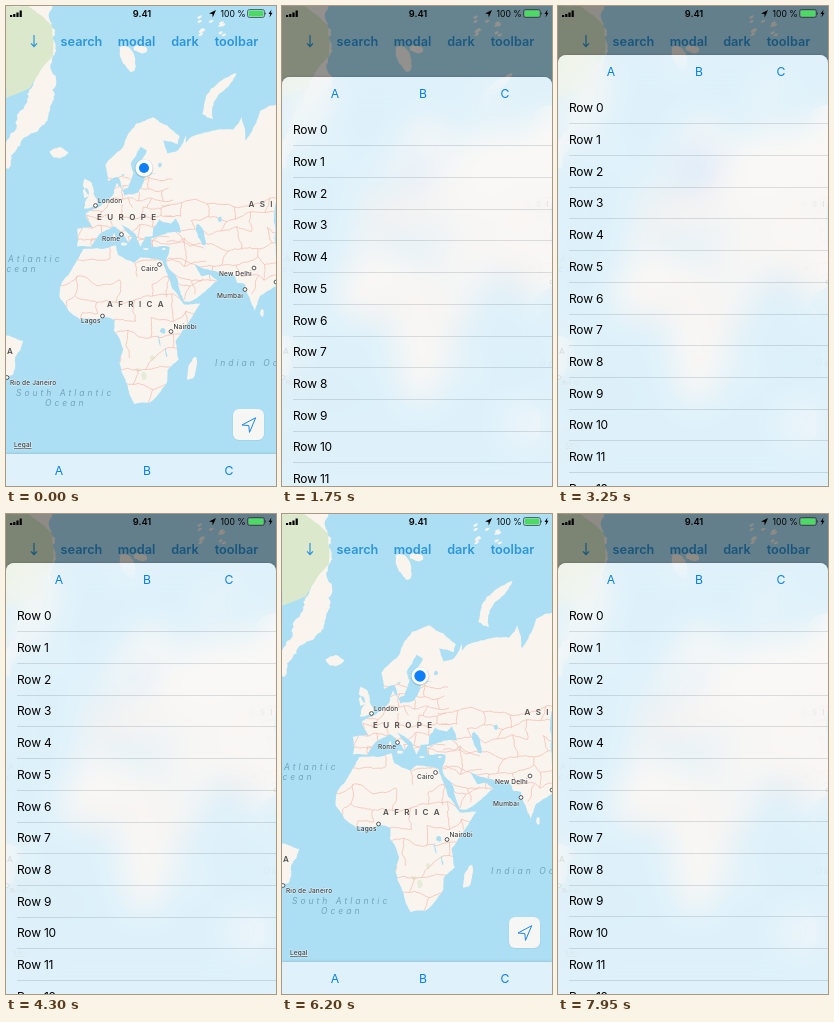
Animation of 270x480 px, one loop 8 s. Source, as an HTML page:

```html
<!DOCTYPE html>
<html lang="en">
<head>
<meta charset="utf-8">
<title>Map with sheet</title>
<style>
  html, body { margin: 0; width: 100%; height: 100%; overflow: hidden; }
  body { position: relative; background: #addff4; font-family: Inter, "Liberation Sans", sans-serif; }
  svg { position: absolute; left: 0; top: 0; width: 270px; height: 480px; }
  #sheet {
    position: absolute; left: 0; top: 0; width: 270px; height: 500px;
    background: rgba(250, 249, 251, .68);
    backdrop-filter: blur(15px) saturate(1.2);
  }
  #sheet b {
    position: absolute; top: 6.7px; width: 40px; margin-left: -20px;
    font: 400 12.2px/20px Inter, "Liberation Sans", sans-serif;
    text-align: center; color: #0a80e6;
  }
  #sheet p {
    position: absolute; left: 11px; right: 0; height: 31px; margin: 0;
    font-size: 12px; line-height: 31px; letter-spacing: -.2px; color: #000;
    border-bottom: .7px solid rgba(60, 70, 80, .16);
  }
  .city { font-size: 6.5px; font-weight: 500; letter-spacing: .15px; fill: #3c3c3c;
    paint-order: stroke; stroke: #fff; stroke-opacity: .6; stroke-width: 1px; }
  .land { font-size: 8px; font-weight: 600; letter-spacing: 5.4px; fill: #505050; }
  .sea { font-size: 8.5px; font-style: italic; letter-spacing: 3px; fill: #6fa5bb; }
  .nav { font-size: 12.7px; font-weight: 600; fill: #2c96da; text-anchor: middle; }
  .border { fill: none; stroke: #f4bcb2; stroke-width: .75; clip-path: url(#coast); }
</style>
</head>
<body>
<svg id="map" viewBox="0 0 270 480"></svg>
<div id="sheet"></div>
<svg id="status" viewBox="0 0 270 480">
  <path d="M4 9h2.2v2H4zM7.2 8h2.2v3H7.2zM10.4 6.5h2.2V11h-2.2zM13.6 4.5h2.2V11h-2.2z"/>
  <text x="136" y="11" text-anchor="middle" font-size="9.3" font-weight="600">9.41</text>
  <path d="M210 4l-7 3.6 3.4.3.3 3.5z"/>
  <text x="214.5" y="10.8" font-size="8.6">100 %</text>
  <rect x="241.5" y="3.5" width="17" height="8" rx="2" fill="none" stroke="#333" stroke-width=".7"/>
  <rect x="242.6" y="4.6" width="14.8" height="5.8" rx="1.1" fill="#4cd964"/>
  <path d="M259.3 6v3q1.2-1.5 0-3M265.5 3.5l-3 4.6h1.7l-.7 3.4 3-4.7h-1.7z"/>
</svg>
<script>
const $ = id => document.getElementById(id);
const water = '#addff4', land = '#f9f5ee';

let seed = 7;
const rand = () => (seed = seed * 16807 % 2147483647) / 2147483647;
const jitter = size => (rand() - .5) * 2 * size;

// Midpoint displacement turns a straight edge into a ragged one
function ragged([x, y], [u, v], rough) {
  const len = Math.hypot(u - x, v - y);
  if (len < 3) return [[u, v]];
  const k = jitter(rough), mid = [(x + u) / 2 + (v - y) * k, (y + v) / 2 - (u - x) * k];
  return [...ragged([x, y], mid, rough), ...ragged(mid, [u, v], rough)];
}
const trace = pts => 'M' + pts.map(p => p.map(n => n.toFixed(1)).join(' ')).join('L');
const outline = (pts, rough) =>
  trace(pts.flatMap((p, i) => ragged(p, pts[(i + 1) % pts.length], rough))) + 'Z';

// Key points "lon lat lon lat ..." in Mercator projection
function coast(s, rough = .1) {
  const pts = [];
  s.trim().replace(/(\S+)\s+(\S+)/g, (_, lon, lat) =>
    pts.push([89.3 + 2.06 * lon, 322.3 - 118 * Math.asinh(Math.tan(lat * Math.PI / 180))]));
  return outline(pts, rough);
}

// Irregular ellipse, for islands and lakes
function blob(x, y, rx, ry, tilt = 0) {
  const c = Math.cos(tilt), s = Math.sin(tilt);
  return outline(Array.from({ length: 9 }, (_, i) => {
    const a = i / 9 * 2 * Math.PI, k = 1 + jitter(.2);
    const dx = rx * k * Math.cos(a), dy = ry * k * Math.sin(a);
    return [x + dx * c - dy * s, y + dx * s + dy * c];
  }), .1);
}

// Borders: a jittered brick mesh, clipped to the land
function mesh(x0, y0, x1, y1, step) {
  const cols = Math.ceil((x1 - x0) / step), rows = Math.ceil((y1 - y0) / step);
  const node = Array.from({ length: rows + 1 }, (_, j) => Array.from({ length: cols + 1 }, (_, i) =>
    [x0 + i * step + jitter(step * .35), y0 + j * step + jitter(step * .35)]));
  const edge = (a, b) => rand() < .88 ? trace([a, ...ragged(a, b, .12)]) : '';
  let d = '';
  for (let j = 0; j < rows; j++) {
    for (let i = 0; i < cols; i++) {
      d += edge(node[j][i], node[j][i + 1]);
      if ((i + j) % 2) d += edge(node[j][i], node[j + 1][i]);
    }
  }
  return d;
}

const europe = `89 73 80 72 73 67 71 71 67 69 60 69 46 67.5 44 66.5 44 68 40 65 35 64.4 33 67 40 66.3 41 67.7 28 71
  20 70 12 65 5 62 6 58 11 59 13 55.5 16 56.2 18.5 60 17.2 62 22 65.8 25 65 21.4 62 23 60 30 60 24 59 21 55 14 54
  10.5 57.5 8.5 54 1.6 50.6 -4.7 48.4 -1.2 44 -9 43.4 -9 37 -2 36.8 3 42 9 44.4 16 38.5 18 40.3 12.5 45
  19.5 41.5 22 36.8 24 40.6 28 41`;
const asia = `28 43.4 31 46.6 36.5 45.2 39 47 41.5 42 35 42 27 40 27.5 36.7 36 36.7 34.5 31.2 35 29 43 13 45 12.8
  59.5 22.5 56 25 51.5 24.5 48 30 57 27 67 25 69 21.5 72.7 21 77.5 8.2 80 15.5 90 22`;
const africa = `-6 35.8 10 37.3 11 33.5 19 30.3 22 32.6 32.5 31 35.5 24 37.3 19 43 11.5 51 11.9 42 -1.5 39 -6
  40.5 -15 35 -20 35 -24.5 32 -29 26 -34 19 -34.5 14.5 -24 11.8 -17 13.5 -10 9 -1 9.5 4 5 5.5 -7.5 4.4 -13 8.5
  -17.3 14.7 -16.5 21 -9.7 30`;
const mainland = coast(europe + ' ' + asia, .08) + coast(africa, .06);
const islands =
  coast('-46 84 -22 83 -21 78 -19 76 -23 71 -32 68 -41 64 -42 61 -46 60', .2) +
  coast('-5.5 50.1 1.4 51.2 -2 57.6 -5 58.6 -6 56.7 -3 54 -5 52') +
  coast('52 71.5 56 75 68.5 76.9 58 73.5 57 70.7') +
  coast('-46 -2 -35 -6 -39 -14 -40 -22 -46 -24') +
  blob(80, 187, 3, 5) + blob(52, 147, 9, 5) +
  blob(122, 53, 6, 15, -.4) + blob(135, 43, 7, 4) +
  blob(186, 363, 4, 13, .25) + blob(118, 238, 3, 1.5) + blob(108, 231, 1.2, 4) +
  blob(140, 243, 3, .8) + blob(158, 243, 2, 1) + blob(256, 307, 2, 4) +
  Array.from({ length: 12 }, () => blob(202 + jitter(16), 20 + jitter(9), 2.5, 1.2, -.5)).join('');
const lakes = blob(195, 228, 4, 12, -.3) + blob(214, 213, 2, 3) + blob(157, 325, 2.6, 2.6) +
  blob(153, 334, .7, 6, -.2) + blob(160, 347, .7, 5, -.2) + blob(154, 159, 2, 2.5) + blob(117, 169, 1.5, 1);
const parks = blob(132, 364, 3, 2) + blob(138, 370, 3, 4) + blob(146, 352, 2, 3);
const borders = mesh(55, 238, 185, 400, 18) + mesh(74, 172, 158, 236, 10) + mesh(158, 196, 276, 285, 15);
const iceless = outline([[0, 0], [22, 0], [46, 20], [47, 50], [24, 82], [0, 92]], .04);

const fill = (d, c) => `<path d="${d}" fill="${c}"/>`;
const text = (cls, x, y, s, extra = '') => `<text class="${cls}" x="${x}" y="${y}" ${extra}>${s}</text>`;
const city = (x, y, tx, ty, s) =>
  `<circle cx="${x}" cy="${y}" r="1.9" fill="#fff" stroke="#444" stroke-width=".9"/>` + text('city', tx, ty, s);

$('map').innerHTML =
  `<clipPath id="coast"><path d="${mainland}"/></clipPath>` +
  fill(mainland + islands, land) + fill(iceless, '#dbe8cb') + fill(parks, '#e6ecd8') +
  `<path class="border" d="${borders}"/>` + fill(lakes, water) +
  text('sea', 2, 256, 'Atlantic') + text('sea', -9, 266, 'Ocean') +
  text('sea', 10, 390, 'South Atlantic') + text('sea', 39, 400, 'Ocean') + text('sea', 209, 360, 'Indian Ocean') +
  text('land', 91, 214, 'EUROPE') + text('land', 101, 301, 'AFRICA') +
  text('land', 242.5, 201, 'ASIA') + text('land', 1, 348, 'A') +
  city(89.5, 199.5, 92, 197, 'London') + city(115.5, 228.5, 96, 235, 'Rome') +
  city(153.5, 258.5, 135, 265, 'Cairo') + city(248, 262, 213, 270, 'New Delhi') +
  city(239, 283.5, 211, 291.5, 'Mumbai') + city(96.5, 310, 75, 317, 'Lagos') +
  city(165, 325.5, 167.5, 323, 'Nairobi') + city(1, 371.5, 4, 379.3, 'Rio de Janeiro') +
  city(270, 276, 280, 276, '') +
  text('city', 8, 441, 'Legal', 'text-decoration="underline"') +
  `<circle id="halo" cx="138" cy="162" fill="#2f80e0"/>
   <circle cx="138" cy="162.6" r="9.4" fill="#000" opacity=".13"/>
   <circle cx="138" cy="162" r="8.5" fill="#fff"/>
   <circle id="dot" cx="138" cy="162" fill="#0d7ff8"/>
   <rect x="226.5" y="403" width="32" height="32" rx="6.5" fill="#000" opacity=".06"/>
   <rect x="227" y="403" width="31" height="31" rx="6" fill="#f6f6f4"/>
   <path d="M249.7 411.7L236 419l6.8.6.7 6.8z" fill="none" stroke="#1c88ea" stroke-linejoin="round"/>
   <path d="M28 29v11.5m-3-3.2l3 3.2 3-3.2" fill="none" stroke="#2c96da" stroke-width="1.2"/>` +
  [[75.5, 'search'], [130.5, 'modal'], [179, 'dark'], [230.5, 'toolbar']]
    .map(([x, s]) => text('nav', x, 39.5, s)).join('');

const rowGap = 31.7;
$('sheet').innerHTML =
  [[53, 'A'], [141, 'B'], [223, 'C']].map(([x, s]) => `<b style="left:${x}px">${s}</b>`).join('') +
  Array.from({ length: 14 }, (_, i) => `<p style="top:${37.5 + i * rowGap}px">Row ${i}</p>`).join('');

const clamp = v => Math.min(1, Math.max(0, v));
const smooth = v => (v = clamp(v)) * v * (3 - 2 * v);

// Step response of a slightly underdamped spring, time in ms
function spring(ms) {
  if (ms <= 0) return 0;
  const z = .88, w = 9.5, wd = w * Math.sqrt(1 - z * z), t = ms / 1000;
  return 1 - Math.exp(-z * w * t) * (Math.cos(wd * t) + z * w / wd * Math.sin(wd * t));
}

function draw(t) {
  const phase = (t + 1500) % 2000;
  const q = clamp(phase / 1400);
  $('halo').setAttribute('r', 8 + 35 * (1 - (1 - q) ** 1.3));
  $('halo').setAttribute('opacity', .3 * (1 - q * q));
  $('dot').setAttribute('r', 6.1 - 1.1 * (smooth((phase - 900) / 600) - smooth((phase - 1500) / 350)));

  const open = spring(t - 1350) - spring(t - 5300) + spring(t - 7350);
  const style = $('sheet').style;
  style.top = 448 - 399 * open + 'px';
  style.borderRadius = `${8 * clamp(open)}px ${8 * clamp(open)}px 0 0`;
  style.boxShadow = `0 0 3px rgba(0,0,0,.2), 0 0 0 500px rgba(0,0,0,${.43 * clamp(open)})`;
}

const start = performance.now();
(function tick() {
  draw((performance.now() - start) % 8000);
  requestAnimationFrame(tick);
})();
</script>
</body>
</html>
```
